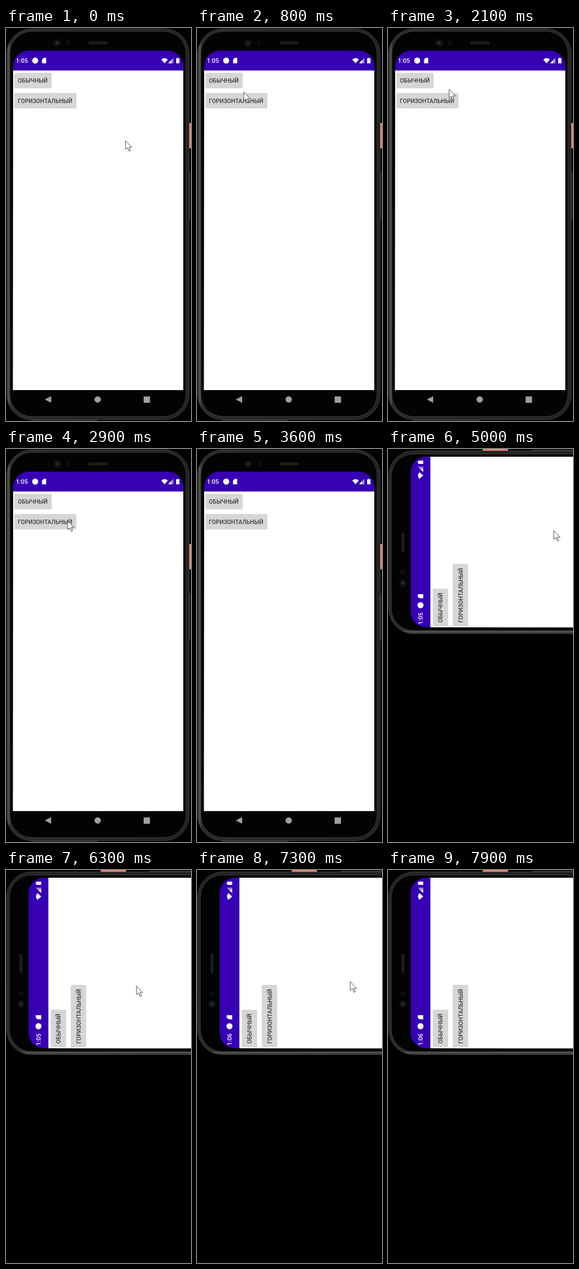
These frames come from a looping animation (336 by 712 pixels, 8 s). An HTML page:

```html
<!DOCTYPE html>
<html lang="ru">
<head>
<meta charset="utf-8">
<style>
  html, body { margin: 0; width: 100%; height: 100%; overflow: hidden; background: #000; }
  svg { display: block; width: 336px; height: 712px; }
  text { font: 500 10.5px Roboto, sans-serif; fill: #3c3c3c; }
  .clock { font-size: 11px; fill: #fff; }
</style>
</head>
<body>
<svg viewBox="0 0 336 712">
  <defs>
    <linearGradient id="rim">
      <stop offset="0" stop-color="#222"/>
      <stop offset=".01" stop-color="#585858"/>
      <stop offset=".02" stop-color="#2a2a2a"/>
      <stop offset="1" stop-color="#222"/>
    </linearGradient>

    <g id="body">
      <rect x="332" y="172" width="4" height="46" rx="1" fill="#e68877"/>
      <rect x="332" y="261" width="3" height="86" rx="1" fill="#2d2d2d"/>
      <rect x="1.5" y="1.5" width="331" height="708" rx="45" fill="url(#rim)" stroke="#444"/>
      <rect x="7" y="6" width="320" height="698" rx="40" fill="#030303" stroke="#404040"/>
      <path d="M45 711H166" stroke="#555"/>
      <circle cx="93" cy="27" r="7" fill="#121212"/>
      <circle cx="93" cy="27" r="2" fill="#383838"/>
      <rect x="109" y="22" width="7" height="10" rx="3" fill="#0d0d0d"/>
      <rect x="150" y="25" width="34" height="4" rx="2" fill="#181818" stroke="#2c2c2c"/>
    </g>

    <g id="screen">
      <path d="M13 77H322V656H12.500Z" fill="#fff"/>
      <path d="M13 77V69A28 28 0 0 1 41 41H294A28 28 0 0 1 322 69V77Z" fill="#3700b3"/>
      <text class="clock" x="18" y="63">1:05</text>
      <g fill="#fff">
        <circle cx="53" cy="59" r="5.5"/>
        <path d="M65.5 57.5L68.5 54H73V64H65.5Z"/>
        <path d="M282 57Q288 52 294 57L288 64Z"/>
        <path d="M304 54V64H294.5Z" opacity=".55"/>
        <path d="M300 58V64H294.5Z"/>
        <path d="M309 55H311V54H313V55H315V64H309Z"/>
      </g>
      <g id="buttons"></g>
    </g>

    <g id="nav" fill="#a0a0a0">
      <path d="M70.5 673L82 667V679Z"/>
      <circle cx="166.5" cy="673" r="5.8"/>
      <rect x="250" y="667.5" width="11.5" height="11.5"/>
    </g>

    <clipPath id="turnedOutline">
      <rect x="1" y="3" width="709" height="332" rx="45"/>
      <rect x="172" width="46" height="6"/>
      <rect x="261" y="1" width="86" height="6"/>
    </clipPath>
  </defs>

  <rect width="336" height="712"/>
  <g id="upright">
    <use href="#body"/><use href="#screen"/><use href="#nav"/>
  </g>
  <g id="turned" transform="translate(0 336) rotate(-90)">
    <use id="turnedBody" href="#body"/>
    <rect x="13" y="41" width="309" height="615"/>
    <use href="#screen"/>
  </g>
  <path id="cursor" d="M0 0V16L4 12.500L6.500 19L9 18L6.500 12H11.500Z"
        fill="#fff" stroke="#333" stroke-width=".9" stroke-linejoin="round"/>
</svg>
<script>
const LOOP = 8000, STEP = 100;
const TURN_START = 4100, TURN_END = 4200, MINUTE = 6500;
const get = id => document.getElementById(id);
const clock = document.querySelector('.clock');

function button(label, y, width) {
  return `<rect x="15.3" y="${y}" width="${width}" height="27.2" rx="1.5"
    fill="#d5d7d6" stroke="#c9cbca" stroke-width=".5"/>
    <text x="21.6" y="${y + 17.5}">${label}</text>`;
}
get('buttons').innerHTML = button('ОБЫЧНЫЙ', 81.8, 67.2) + button('ГОРИЗОНТАЛЬНЫЙ', 118, 112.2);

// Pointer strokes; the pointer rests at the end of each until the next begins
const moves = [
  stroke(0, 800, 'M217 204C320 220 280 60 85 116'),
  stroke(800, 2100, 'M85 116C-110 250 290 130 111 111'),
  stroke(2100, 3000, 'M111 111Q120 125 110 132'),
  stroke(3100, 3600, 'M110 132Q200 125 312 170'),
  stroke(4600, 5600, 'M250 0C430 250 70 320 231 210'),
  stroke(6200, 6300, 'M231 210H237'),
  stroke(7000, 7800, 'M237 210Q290 210 336 163')
];

function stroke(start, end, d) {
  const path = document.createElementNS('http://www.w3.org/2000/svg', 'path');
  path.setAttribute('d', d);
  return { start, end, path };
}

function pointerAt(t) {
  const { start, end, path } = moves.filter(m => m.start <= t).pop();
  const progress = Math.min(1, (t - start) / (end - start));
  return path.getPointAtLength(path.getTotalLength() * progress);
}

const show = (id, on) => get(id).setAttribute('display', on ? 'inline' : 'none');

function draw() {
  const t = Math.floor((performance.now() - begin) % LOOP / STEP) * STEP;
  const turning = t >= TURN_START && t < TURN_END;
  show('upright', t < TURN_END);
  show('turned', t >= TURN_START);
  show('turnedBody', !turning);
  get('upright').setAttribute('clip-path', turning ? 'url(#turnedOutline)' : 'none');
  clock.textContent = t < MINUTE ? '1:05' : '1:06';

  const { x, y } = pointerAt(t);
  show('cursor', t < 3600 || t >= 4600 && t < 7800);
  get('cursor').setAttribute('transform', `translate(${x} ${y})`);
  requestAnimationFrame(draw);
}
const begin = performance.now();
draw();
</script>
</body>
</html>
```
